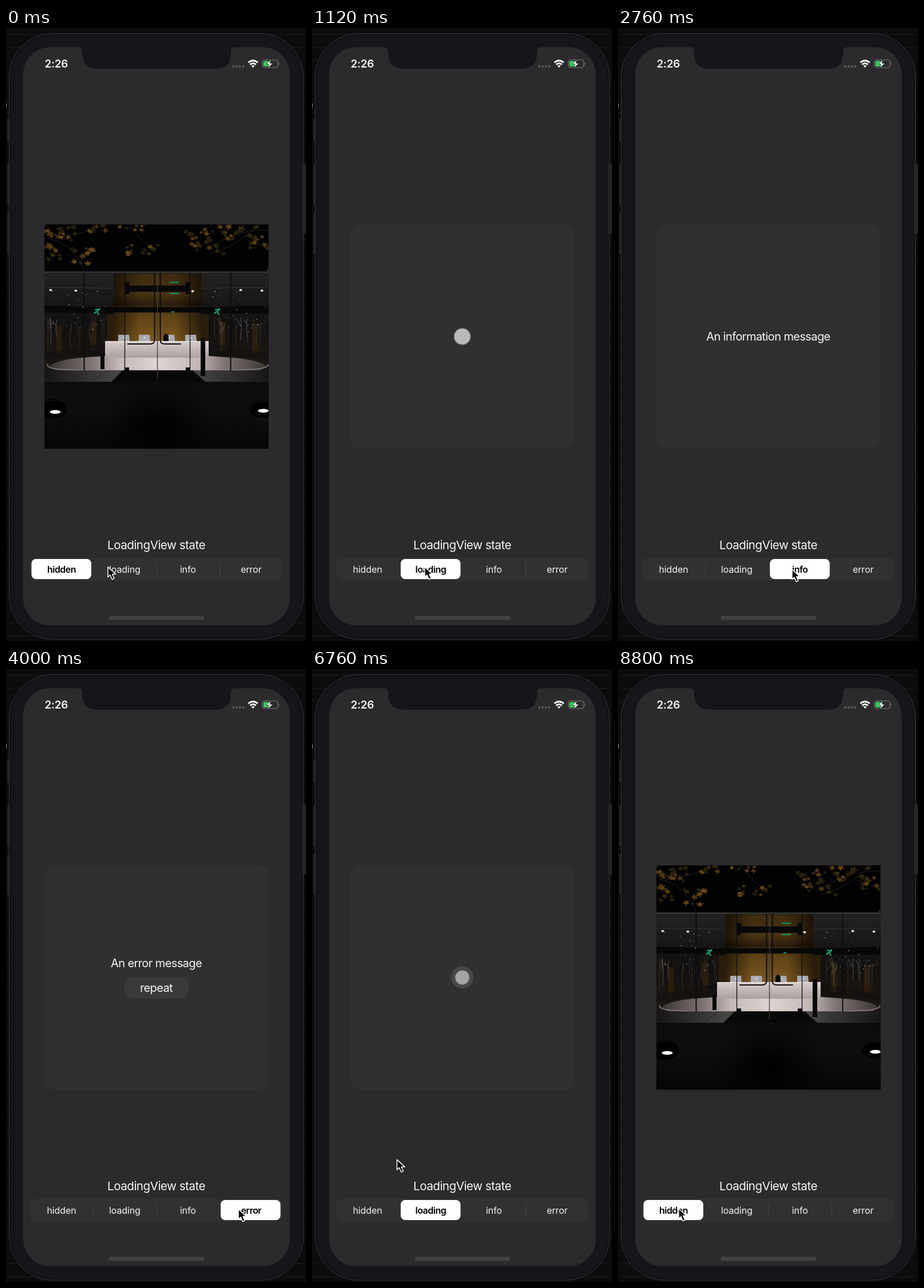
These frames come from a looping animation (524x1069 px, 8840 ms). An HTML page:

```html
<!DOCTYPE html>
<html lang="en">
<head>
<meta charset="utf-8">
<title>LoadingView state</title>
<style>
  html, body { margin: 0; width: 100%; height: 100%; overflow: hidden; background: #0c0b0d; }
  svg { display: block; width: 100%; height: 100%; }
  text { font-family: Inter, "Liberation Sans", sans-serif; fill: #f6f5f7; text-anchor: middle; }
  .title { font-size: 20.6px; letter-spacing: -.5px; }
  .message { font-size: 20px; letter-spacing: -.6px; }
  .label { font-size: 16px; letter-spacing: -.1px; }
  .label.on { font-weight: 600; letter-spacing: -.5px; fill: #000; }
  .clock { font-size: 19px; font-weight: 600; letter-spacing: -.3px; text-anchor: start; }
</style>
</head>
<body>
<svg viewBox="0 0 524 1069" preserveAspectRatio="none">
  <defs>
    <clipPath id="photoClip"><rect x="67" y="342.5" width="391.5" height="391"/></clipPath>
    <linearGradient id="wall" x2="0" y2="1">
      <stop offset="0" stop-color="#3d2b10"/><stop offset=".3" stop-color="#4a3414"/>
      <stop offset=".45" stop-color="#2b1e0b"/><stop offset=".6" stop-color="#5d4217"/>
      <stop offset="1" stop-color="#7d591f"/>
    </linearGradient>
    <linearGradient id="wallSides">
      <stop offset="0" stop-color="#000" stop-opacity=".6"/><stop offset=".3" stop-color="#000" stop-opacity="0"/>
      <stop offset=".7" stop-color="#000" stop-opacity="0"/><stop offset="1" stop-color="#000" stop-opacity=".6"/>
    </linearGradient>
    <linearGradient id="glass" x2="0" y2="1">
      <stop offset="0" stop-color="#242322"/><stop offset=".3" stop-color="#191716"/>
      <stop offset=".55" stop-color="#12100e"/><stop offset="1" stop-color="#1d1815"/>
    </linearGradient>
    <linearGradient id="floor">
      <stop offset="0" stop-color="#3a3534"/><stop offset=".2" stop-color="#7f7675"/>
      <stop offset=".32" stop-color="#c3b9b7"/><stop offset=".5" stop-color="#ded5d3"/>
      <stop offset=".68" stop-color="#c3b9b7"/><stop offset=".8" stop-color="#7f7675"/>
      <stop offset="1" stop-color="#3a3534"/>
    </linearGradient>
    <linearGradient id="desk" x2="0" y2="1">
      <stop offset="0" stop-color="#d6cecd"/><stop offset="1" stop-color="#a9a09f"/>
    </linearGradient>
    <linearGradient id="paving">
      <stop offset="0" stop-color="#171616"/><stop offset=".3" stop-color="#454243"/>
      <stop offset=".7" stop-color="#454243"/><stop offset="1" stop-color="#171616"/>
    </linearGradient>
    <linearGradient id="ground" x2="0" y2="1">
      <stop offset="0" stop-color="#0d0c0b"/><stop offset=".4" stop-color="#100e0d"/><stop offset="1" stop-color="#060505"/>
    </linearGradient>
    <radialGradient id="shade"><stop offset="0" stop-color="#000"/><stop offset="1" stop-color="#000" stop-opacity="0"/></radialGradient>
  </defs>

  <rect width="524" height="1069" fill="#0c0b0d"/>
  <g id="rules" stroke="#1e1c20"></g>
  <text x="-3.5" y="140" font-size="17" style="fill:#bbb; text-anchor:start">)</text>

  <!-- phone -->
  <g fill="#222023" stroke="#050506" stroke-width="1.5">
    <rect x="1" y="157" width="12" height="42" rx="2"/>
    <rect x="1" y="236" width="12" height="74" rx="2"/>
    <rect x="1" y="321" width="12" height="74" rx="2"/>
  </g>
  <rect x="5.5" y="9.5" width="514" height="1056.5" rx="76" fill="#171519" stroke="#363438"/>
  <rect x="8" y="12" width="509" height="1051.5" rx="73" fill="none" stroke="#111013" stroke-width="2"/>
  <rect x="517" y="236" width="7" height="123" rx="2" fill="#262427"/>
  <rect x="30" y="33.5" width="465.5" height="1008" rx="47" fill="#2c2a2d"/>
  <path d="M126 33h274q-7 1-7 8v3q0 27-27 27H160q-27 0-27-27v-3q0-7-7-8z" fill="#171519"/>

  <!-- status bar -->
  <text class="clock" x="67.5" y="69">2:26</text>
  <g fill="#5e5c5f">
    <circle cx="397" cy="67" r="2"/><circle cx="402.8" cy="67" r="2"/>
    <circle cx="408.6" cy="67" r="2"/><circle cx="414.4" cy="67" r="2"/>
  </g>
  <g fill="none" stroke="#fff" stroke-width="2.9">
    <path d="M423.3 60.2q8.2-7 16.4 0"/><path d="M426.4 63.7q5.1-4.4 10.2 0"/>
  </g>
  <path d="M428.6 66.1q2.9-2.3 5.8 0l-2.9 3z" fill="#fff"/>
  <rect x="447.8" y="55.5" width="27" height="13.5" rx="4" fill="none" stroke="#7d7b7e" stroke-width="1.2"/>
  <path d="M476.4 60q2 2.2 0 4.4z" fill="#7d7b7e"/>
  <rect x="449.7" y="57.4" width="10" height="9.7" rx="2.2" fill="#32d158"/>
  <path d="M463 55l-8.5 8.2h5l-2.2 6.8 8.8-8.6h-5.2z" fill="#fff" stroke="#2c2a2d" stroke-width=".8"/>

  <rect id="panel" x="67" y="342.5" width="391.5" height="391" rx="17" fill="#312f32"/>

  <!-- photo -->
  <g id="photo" clip-path="url(#photoClip)">
    <rect x="67" y="342" width="392" height="392" fill="#020202"/>
    <g id="leaves"></g>
    <rect x="67" y="425" width="392" height="173" fill="url(#glass)"/>
    <path d="M176 500h12v46h-12zM341 500h13v46h-13zM372 512h11v52h-11zM88 520h9v50h-9zM148 512h9v50h-9zM430 516h10v50h-10z" fill="#2b1d0b"/>
    <g id="reflections" stroke-linecap="round" fill="none"></g>
    <rect x="188" y="428" width="153" height="120" fill="url(#wall)"/>
    <rect x="188" y="428" width="153" height="120" fill="url(#wallSides)"/>
    <path d="M67 484l100 3h190l102-3v14H341v-2H188v2l-121-2z" fill="#080808"/>
    <path d="M67 425.5h392" stroke="#454445" stroke-width="1.5"/>
    <path d="M67 453q60-1 121 1M341 454q60-2 118-1" stroke="#343435" fill="none"/>
    <path d="M75 591q12-12 55-16l45-3h180l42 3q48 4 59 16l-12 6H88z" fill="url(#floor)"/>
    <path d="M67 578l60-5 46-2v-22l-60 10q-30 6-46 8zM459 578l-60-5-45-2v-22l60 10q30 6 45 8z" fill="#12100f" opacity=".6"/>
    <path d="M73 586q-3 7 18 9l40 2h264l42-2q24-3 20-9" fill="none" stroke="#a09998" stroke-width="1.2"/>
    <path d="M173 546h181v26q-10 3-27 3H199q-17 0-26-3z" fill="url(#desk)"/>
    <path d="M173 546.5h181" stroke="#f5f0f0"/>
    <g id="monitors" fill="#a9abb0"></g>
    <path d="M275 546v-9q4-8 9 0v9z" fill="#0b0a0a"/>
    <path d="M67 597h392v20H67z" fill="url(#paving)"/>
    <path d="M204 597h122l22 20H184z" fill="#090808"/>
    <path d="M150 617l26-20M360 597l24 20M110 617l30-20M392 597l32 20" stroke="#232122"/>
    <path d="M207 443h8v6h99v-6h8v21h-8v-4h-99v4h-8z" fill="#08080a"/>
    <path d="M286 443.5h16M286 463h16" stroke="#0a9a64" stroke-width="2"/>
    <path d="M289 495h5" stroke="#0c8f5c" stroke-width="2"/>
    <g fill="none" stroke="#0c0b0a">
      <path d="M136.500 426v171M392.500 426v171" stroke-width="2"/>
      <path d="M207.500 426v172M321.500 426v172M264.500 426v185" stroke-width="1.300"/>
      <path d="M259.500 427v117q0 7-8 7H212M269.500 427v117q0 7 8 7h28" stroke-width="2"/>
    </g>
    <path d="M264.500 427v184" stroke="#88817b" stroke-width=".5"/>
    <path d="M165 568h7v27h-7zM340 541h8v66h-8zM207 592h8v8h-8zM314 592h8v8h-8z" fill="#080808"/>
    <g stroke="#12b877" stroke-width="2" fill="none">
      <path id="exit" d="M155 491h7l-3 4 3 5M158 494l-4 4M163 489v3"/>
      <use href="#exit" x="210"/>
    </g>
    <g id="lights" fill="#e9edf2"></g>
    <rect x="67" y="617" width="392" height="117" fill="url(#ground)"/>
    <ellipse cx="265" cy="690" rx="100" ry="75" fill="url(#shade)"/>
    <ellipse cx="82" cy="664" rx="25" ry="17" fill="#000"/>
    <path d="M68 650q34-4 38 9-2 12-18 17" fill="none" stroke="#1d1b1a"/>
    <ellipse cx="449" cy="664" rx="24" ry="15" fill="#000"/>
    <path d="M458 651q-28 0-30 9 2 10 16 15" fill="none" stroke="#1d1b1a"/>
    <g fill="#fff">
      <ellipse cx="86" cy="669.500" rx="9.500" ry="3.200"/><ellipse cx="449.500" cy="667.500" rx="9.500" ry="3.200"/>
    </g>
  </g>

  <!-- panel contents -->
  <g id="loader">
    <circle id="halo" cx="262.5" cy="538" fill="#fff"/>
    <circle id="dot" cx="262.5" cy="538" fill="#fff"/>
  </g>
  <text id="info" class="message" x="262.5" y="545">An information message</text>
  <g id="error">
    <text class="message" x="262.5" y="520">An error message</text>
    <rect x="207" y="537" width="112" height="37.500" rx="15" fill="#3b393c"/>
    <text class="message" x="262.5" y="563">repeat</text>
  </g>

  <!-- segmented control -->
  <text class="title" x="262.5" y="909">LoadingView state</text>
  <rect x="42" y="924" width="441" height="40" rx="9.500" fill="#323033"/>
  <g id="dividers" fill="#454346"></g>
  <rect id="pill" x="44.500" y="926" width="104.500" height="35" rx="8" fill="#fff"/>
  <g id="labels"></g>

  <rect x="179.500" y="1025" width="166.500" height="7" rx="3.500" fill="#434144"/>
  <path id="cursor" d="M0 0v17.500l4-3.700 3.300 7.700 3.700-1.600-3.300-7.400h5.800z" fill="#000" stroke="#fff" stroke-width="1.500" stroke-linejoin="round"/>
</svg>

<script>
const LOOP = 8840;
const NAMES = ['hidden', 'loading', 'info', 'error'];
const HIDDEN = 0, LOADING = 1, INFO = 2, ERROR = 3;
const STEP = 110.4;
const $ = id => document.getElementById(id);

function add(parent, tag, attrs, text) {
  const el = document.createElementNS('http://www.w3.org/2000/svg', tag);
  for (const key in attrs) el.setAttribute(key, attrs[key]);
  if (text) el.textContent = text;
  return $(parent).appendChild(el);
}

let seed = 11;
const random = () => (seed = seed * 16807 % 2147483647) / 2147483647;
const between = (a, b) => a + (b - a) * random();

function leaf(x, y) {
  const turn = between(0, 6.28), size = between(3.5, 8);
  const points = Array.from({ length: 10 }, (_, i) => {
    const r = i % 2 ? size * .42 : size * between(.75, 1.1);
    const a = turn + i * Math.PI / 5;
    return `${(x + r * Math.cos(a)).toFixed(1)},${(y + r * .8 * Math.sin(a)).toFixed(1)}`;
  });
  const fill = ['#4d3517', '#33270f', '#231d0e', '#644519', '#28210f'][Math.floor(random() * 5)];
  add('leaves', 'polygon', { points: points.join(' '), fill });
}

function drawPhoto() {
  const branches = 'M67 352q40 20 95 -6M72 366q50 12 66 62M215 343q18 26 50 50M459 352q-60 0-105 32M440 343q-40 40-85 50M459 380q-20 0-40-12';
  add('leaves', 'path', { d: branches, fill: 'none', stroke: '#24211e' });
  // centre, spread and number of leaves
  [[95, 357, 28, 14, 24], [135, 400, 20, 16, 14], [82, 392, 14, 14, 10], [158, 350, 22, 7, 8],
   [212, 384, 9, 14, 8], [252, 388, 14, 10, 7], [222, 349, 26, 6, 8], [345, 372, 35, 22, 24],
   [408, 356, 38, 14, 24], [440, 370, 18, 14, 10], [455, 427, 4, 6, 3]]
    .forEach(([x, y, dx, dy, n]) => {
      while (n--) leaf(x + between(-dx, dx), y + between(-dy, dy));
    });

  for (const left of [70, 352]) {
    for (let i = 0; i < 16; i++) {
      const x = left + between(0, 104), y = between(500, 520), h = between(25, 60);
      const d = `M${x} ${y}q${between(-5, 5)} ${h / 2} 0 ${h}m0 ${-h * .6}l${between(-9, 9)} ${-h * .35}`;
      add('reflections', 'path', { d, stroke: i % 4 ? '#2b2826' : '#4c4a49', 'stroke-width': between(.5, 1.3) });
    }
    for (let i = 0; i < 24; i++) {
      add('lights', 'circle', { cx: left + between(0, 104), cy: between(456, 530), r: between(.4, 1), opacity: between(.25, .9) });
    }
  }
  [[78, 457], [122, 458], [410, 457], [447, 458], [326, 459]]
    .forEach(([cx, cy]) => add('lights', 'ellipse', { cx, cy, rx: 2.6, ry: 1.7 }));
  for (const x of [206, 242, 285, 323]) {
    add('monitors', 'path', { d: `M${x - 10} 535h19l1 11h-20z` });
    add('monitors', 'circle', { cx: x, cy: 540, r: 1.2, fill: '#eceef1' });
  }
}

for (let y = 11; y < 1069; y += 22.8) add('rules', 'path', { d: `M0 ${y}h524` });
drawPhoto();
const dividers = [1, 2, 3].map(i => add('dividers', 'rect', { x: 41.7 + i * STEP, y: 932.5, width: 1.2, height: 22 }));
const label = (name, i, cls) => add('labels', 'text', { class: cls, x: 97 + i * STEP, y: 949.5 }, name);
const plain = NAMES.map((name, i) => label(name, i, 'label'));
const bold = NAMES.map((name, i) => label(name, i, 'label on'));

const clamp = x => Math.min(1, Math.max(0, x));
const ease = x => .5 - .5 * Math.cos(Math.PI * clamp(x));
const mix = (a, b, p) => a + (b - a) * p;
const spring = s => 1 - (1 + 16 * s) * Math.exp(-16 * s);

// [time, state]
const changes = [[-2000, HIDDEN], [240, LOADING], [1920, INFO], [3560, ERROR], [5280, LOADING], [7280, HIDDEN]];
// [start, end, x, y]
const moves = [[0, 220, 197, 940], [1240, 1800, 304, 944], [2780, 3440, 406, 942], [4360, 4880, 292, 567], [6200, 7020, 106, 941]];

function cursorAt(t) {
  let x = 178, y = 940;
  for (const [start, end, toX, toY] of moves) {
    const p = ease((t - start) / (end - start));
    x = mix(x, toX, p);
    y = mix(y, toY, p);
  }
  return `translate(${x} ${y})`;
}

function draw(t) {
  const now = changes.findLastIndex(([start]) => start <= t);
  const [start, state] = changes[now];
  const before = changes[Math.max(0, now - 1)][1];
  const weights = (p) => NAMES.map((_, i) => (i === state ? p : 0) + (i === before ? 1 - p : 0));
  const shown = weights(ease((t - start) / 430));
  const chosen = weights(ease((t - start) / 200));

  $('photo').style.opacity = shown[HIDDEN];
  $('panel').style.opacity = 1 - shown[HIDDEN];
  $('loader').style.opacity = shown[LOADING];
  $('info').style.opacity = shown[INFO];
  $('error').style.opacity = shown[ERROR];

  const slide = mix(before, state, spring((t - start) / 1000));
  $('pill').setAttribute('transform', `translate(${slide * STEP} 0)`);
  NAMES.forEach((_, i) => {
    plain[i].style.opacity = 1 - chosen[i];
    bold[i].style.opacity = chosen[i];
  });
  dividers.forEach((el, i) => el.style.opacity = 1 - chosen[i] - chosen[i + 1]);

  const began = changes.findLast(([s, kind]) => s <= t && kind === LOADING);
  const pulse = began ? ease(1 - Math.abs((t - began[0]) / 1000 % 2 - 1)) : 0;
  $('dot').setAttribute('r', mix(10.4, 14, pulse));
  $('dot').style.opacity = mix(.5, .52, pulse);
  $('halo').setAttribute('r', mix(25, 14.5, pulse));
  $('halo').style.opacity = mix(.03, .34, pulse * pulse);

  $('cursor').setAttribute('transform', cursorAt(t));
}

let origin;
function frame(time) {
  origin ??= time;
  draw((time - origin) % LOOP);
  requestAnimationFrame(frame);
}
draw(0);
requestAnimationFrame(frame);
</script>
</body>
</html>
```
